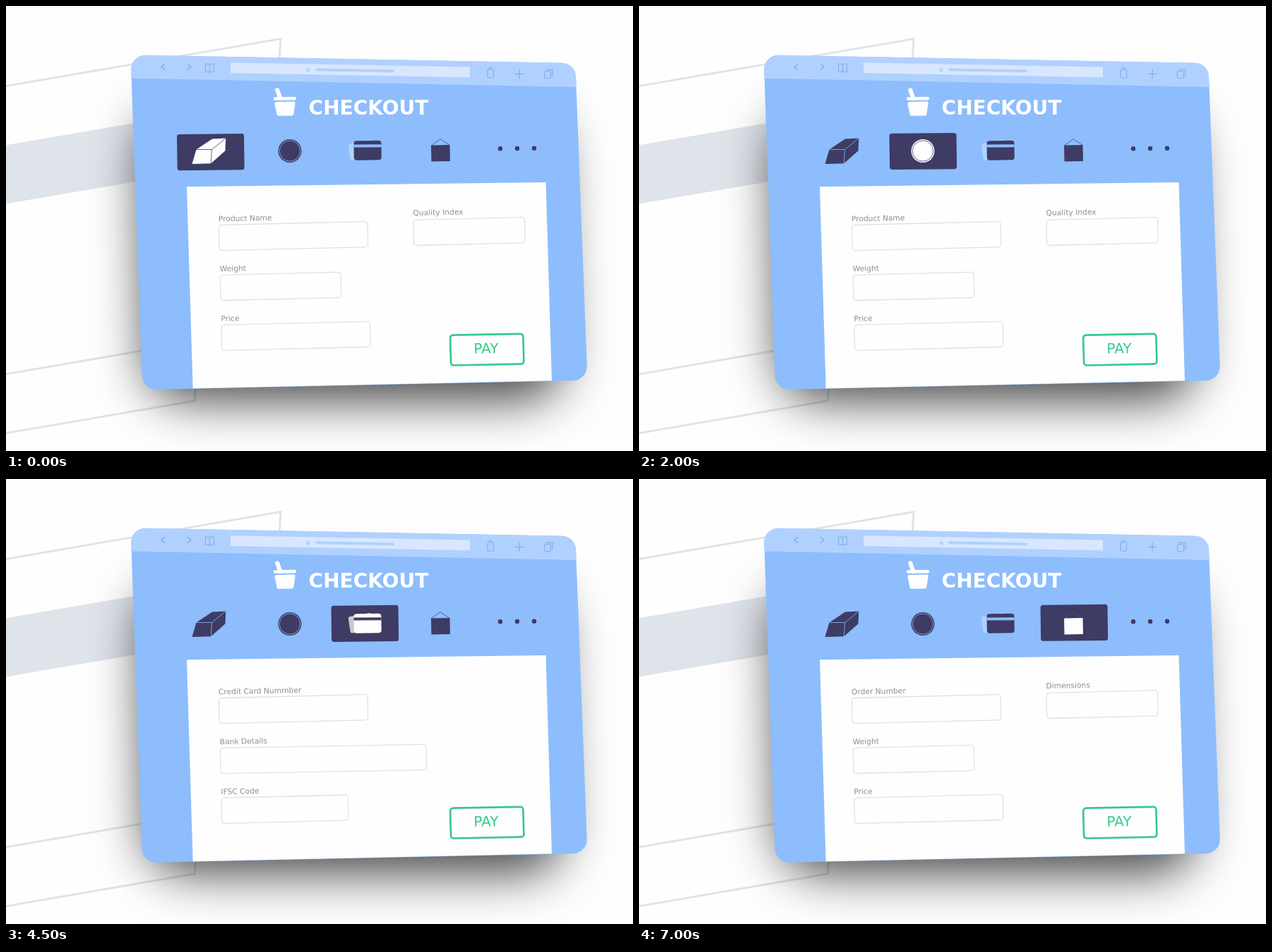
Write an HTML page with a canvas that moves like this. It is 888 by 631 pixels and loops after 8 s.

```html
<!DOCTYPE html>
<html lang="en">
<head>
<meta charset="utf-8">
<title>Checkout</title>
<style>
  html, body { margin: 0; width: 100%; height: 100%; overflow: hidden; background: #fefefe; }
  canvas { display: block; }
</style>
</head>
<body>
<canvas id="stage" width="888" height="631"></canvas>
<script>
const ctx = document.getElementById('stage').getContext('2d');
const BLUE = '#8dbdfd', PALE = '#b0d1ff', DARK = '#3e3b64', WHITE = '#fefefe';
const GREY = '#dfe4eb', TOOL = '#86aeea', GREEN = '#36c98a';
const FONT = '"DejaVu Sans", sans-serif';
const LOOP = 8000, FIRST = 500, STEP = 2500;
const TAB_CENTERS = [289.5, 402, 508, 616];

const field = (label, row, width, column = 0) => ({ label, row, width, column });
const productForm = (name, extra) => [
  field(name, 0, 210.5), field(extra, 0, 157.5, 1),
  field('Weight', 1, 171), field('Price', 2, 210.5)
];
const barForm = productForm('Product Name', 'Quality Index');
const FORMS = [
  barForm,
  barForm,
  [field('Credit Card Nummber', 0, 210.5), field('Bank Details', 1, 292), field('IFSC Code', 2, 179.5)],
  productForm('Order Number', 'Dimensions')
];

function path(points, closed = true) {
  ctx.beginPath();
  points.forEach(p => ctx.lineTo(...p));
  if (closed) ctx.closePath();
}

function roundPath(points, r) {
  const last = points[points.length - 1];
  ctx.beginPath();
  ctx.moveTo((last[0] + points[0][0]) / 2, (last[1] + points[0][1]) / 2);
  points.forEach((p, i) => ctx.arcTo(...p, ...points[(i + 1) % points.length], r));
  ctx.closePath();
}

// Rounded box whose right side rises and whose bottom leans to the right.
function slab(x, y, w, h, r = 0, rise = 0, lean = 0) {
  roundPath([[x, y], [x + w, y - rise], [x + w + lean, y + h - rise], [x + lean, y + h]], r);
}

function fill(color) {
  ctx.fillStyle = color;
  ctx.fill();
}

function stroke(color, width) {
  ctx.strokeStyle = color;
  ctx.lineWidth = width;
  ctx.stroke();
}

function line(color, width, ...points) {
  path(points, false);
  stroke(color, width);
}

function circle(x, y, r) {
  ctx.beginPath();
  ctx.arc(x, y, r, 0, Math.PI * 2);
}

function text(str, x, y, font, color, degrees = 0) {
  ctx.save();
  ctx.translate(x, y);
  ctx.rotate(degrees * Math.PI / 180);
  ctx.font = font;
  ctx.fillStyle = color;
  ctx.fillText(str, 0, 0);
  ctx.restore();
}

function drawPaper() {
  const slope = 0.172;
  const edge = (x, y) => [x, y - x * slope];
  path([edge(0, 197.2), edge(190, 197.2), edge(190, 280.6), edge(0, 280.6)]);
  fill(GREY);
  line(GREY, 3, edge(-4, 113.4), edge(389, 113.4), [387, 80]);
  line(GREY, 3, edge(-4, 605.7), edge(267.5, 605.7), [269, 535]);
  line(GREY, 3, edge(-4, 522), edge(196, 522));
}

function drawShadow() {
  const away = 2000;
  ctx.save();
  ctx.shadowColor = 'rgba(0,0,0,.74)';
  ctx.shadowBlur = 70;
  ctx.shadowOffsetX = away;
  slab(191 - away, 152, 588, 406, 56, 0, 10);
  fill('#000');
  ctx.restore();
}

function drawToolbar() {
  path([[170, 60], [830, 60], [830, 115.4], [170, 102.3]]);
  fill(PALE);
  for (const [x, side] of [[222.5, 1], [259.5, -1]]) {
    line(TOOL, 1.6, [x + 2.5 * side, 82], [x - 2.5 * side, 86.2], [x + 2.5 * side, 90.4]);
  }
  for (const side of [-1, 1]) {
    const at = (dx, y) => [288.5 + side * dx, y];
    path([at(0, 83.5), at(2, 82), at(6, 82), at(6, 93), at(2, 93), at(0, 94)]);
    stroke(TOOL, 1.1);
  }

  slab(318, 80.3, 339, 14.8, 0, -6.2);
  fill('#d8e7ff');
  slab(425.5, 89.5, 5, 3.7);
  fill(PALE);
  circle(428, 89.5, 1.7);
  stroke(PALE, 1);
  ctx.lineCap = 'round';
  line(PALE, 4, [440, 90.3], [548, 92.2]);
  ctx.lineCap = 'butt';

  slab(682, 90, 8.5, 12, 1.5);
  stroke(TOOL, 1.2);
  line(TOOL, 1.2, [684, 90], [684.5, 87.5], [688, 87.5], [688.5, 90]);
  line(TOOL, 1.3, [720.5, 96.3], [733.5, 96.3]);
  line(TOOL, 1.3, [727, 90], [727, 103]);
  slab(762.5, 92.5, 9, 10, 1.5);
  stroke(TOOL, 1.2);
  line(TOOL, 1.2, [764.5, 90.3], [774, 90.3], [774, 100.5]);
}

function drawWindow() {
  ctx.save();
  roundPath([[176.5, 69.3], [806.3, 81], [823.5, 530.7], [193.3, 544.3]], 20);
  fill(BLUE);
  ctx.clip();
  drawToolbar();
  ctx.restore();
  path([[256, 256.3], [764.5, 250], [773, 531.3], [264.7, 542.2]]);
  fill(WHITE);
}

function drawTitle() {
  ctx.lineCap = 'round';
  line(WHITE, 6, [384.3, 119.3], [388.5, 131]);
  ctx.lineCap = 'butt';
  slab(378.8, 129.2, 32.2, 4.7, 2, 0.5);
  fill(WHITE);
  roundPath([[380, 136], [410, 135.5], [407, 155.5], [384, 155.8]], 2.5);
  fill(WHITE);
  text('CHECKOUT', 428.6, 153.5, `bold 28px ${FONT}`, WHITE);
}

function drawBar(ink, paper) {
  const shoulder = [269.5, 203.5], ridge = [291.5, 203.5], corner = [311.3, 187.5], foot = [290.3, 223.3];
  path([[263.5, 224], shoulder, [292, 188.4], corner, [310.5, 205.3], foot]);
  fill(ink);
  line(paper, 0.8, shoulder, ridge, corner);
  line(paper, 0.8, ridge, foot);
}

function drawCoin(ink, paper) {
  circle(402, 205.5, 16.5);
  fill(ink);
  circle(402, 205.5, 14.7);
  stroke(paper, 0.8);
}

function drawCards(ink, paper, selected) {
  slab(484.5, 195.5, 33, 23.5, 3, 6, 3.5);
  fill(selected ? '#c9c9cb' : PALE);
  slab(492.5, 191.2, 38.9, 27.5, 4, 0.5, 0.4);
  fill(ink);
  slab(492.6, 196.6, 38.9, 4, 0, 0.3);
  fill(paper);
}

function drawPicture(ink, paper, selected) {
  slab(602, 197.6, 26.5, 22.8, 0, 0.5, 0.5);
  fill(ink);
  line(selected ? '#57547a' : DARK, 0.7, [602.5, 197.6], [615, 188.7], [628, 197.2]);
}

function drawTabs(active) {
  slab(TAB_CENTERS[active] - 47.5, 182 - active * 1.1, 95, 51.2, 3.5, 1, 0.7);
  fill(DARK);
  [drawBar, drawCoin, drawCards, drawPicture].forEach((drawIcon, i) => {
    const selected = i === active;
    drawIcon(selected ? WHITE : DARK, selected ? DARK : BLUE, selected);
  });
  for (let i = 0; i < 3; i++) {
    circle(700 + i * 24, 202.2 - i * 0.2, 3.2);
    fill(DARK);
  }
}

function drawForm(fields) {
  for (const { label, row, width, column } of fields) {
    const x = 301.5 + row * 1.7 + column * 275.5;
    const y = 310.6 + row * 70.8 - column * 7.2;
    text(label, x - 0.4, y - 5.2 - column * 1.2, `10.7px ${FONT}`, '#8f8f8f', -1.2);
    slab(x, y, width, 36.2, 4, Math.min(width * 0.024, 5), 0.7);
    stroke('#dfe0ea', 1.3);
  }
  slab(629, 466.8, 103.3, 42.8, 4, 2, 1.2);
  stroke(GREEN, 2.7);
  text('PAY', 662.5, 492.8, `20px ${FONT}`, GREEN, -1);
}

function draw(time) {
  const t = time % LOOP;
  const active = Math.ceil((t - FIRST + 1) / STEP);
  const tab = Math.max(0, Math.min(active, FORMS.length - 1));
  ctx.fillStyle = WHITE;
  ctx.fillRect(0, 0, 888, 631);
  drawPaper();
  drawShadow();
  drawWindow();
  drawTitle();
  drawTabs(tab);
  drawForm(FORMS[tab]);
}

let start;
function tick(now) {
  start ??= now;
  draw(now - start);
  requestAnimationFrame(tick);
}
requestAnimationFrame(tick);
</script>
</body>
</html>
```
